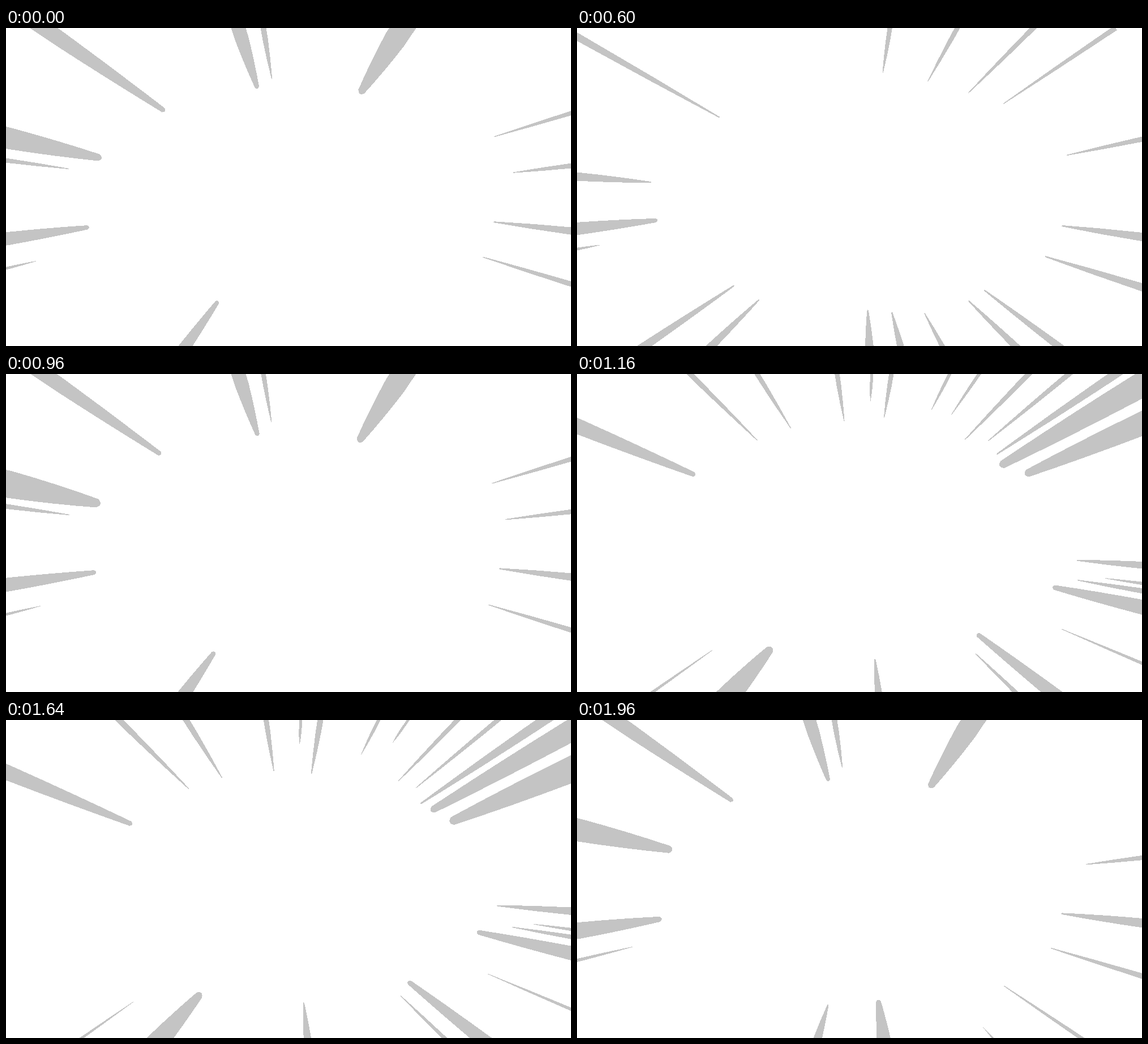
These frames come from a looping animation (998x561 px, 2000 ms). An HTML page:

```html
<!DOCTYPE html>
<html lang="en">
<head>
<meta charset="utf-8">
<title>Speed lines</title>
<style>
  html, body { margin: 0; width: 100%; height: 100%; overflow: hidden; background: #fff; }
  svg { display: block; width: 100vw; height: 100vh; }
</style>
</head>
<body>
<svg viewBox="0 0 998 561" preserveAspectRatio="none">
  <path id="lines" fill="#c4c4c4" shape-rendering="crispEdges"/>
</svg>
<script>
const W = 998, H = 561, STEP = 40, STEPS = 50;
const center = { x: 505, y: 301 };
const clearing = { rx: 346, ry: 189 };

// Ray width where it leaves the stage.
const weights = { hair: 5, thin: 9, medium: 15, bold: 25, heavy: 42 };

// Ray directions in degrees, clockwise from the right.
const burst = {
  heavy: [303, 192], bold: [214.5, 252.6, 172], medium: [6.6],
  thin: [260.5, 17, 353.3], hair: [166.3]
};
const burstEven = { bold: [125.8], thin: [343, 187.6] };
const burstOdd = { bold: [82], medium: [107], thin: [34], hair: [48.6] };
const sparse = {
  bold: [174], medium: [209.5, 184.4, 7.8, 17.6, 87.5, 75.7, 37, 44, 146, 135.8],
  thin: [279, 299, 315, 326, 348, 61.7], hair: [170]
};
const dense = {
  heavy: [330.2, 336.6, 131.6], bold: [202.5, 12.6, 38], medium: [4.2, 326, 84],
  thin: [224.6, 238.2, 261.4, 279.5, 314.2, 320.4, 44, 9.4],
  hair: [273, 297, 304.3, 7.9, 23, 145]
};
const cycle = [[burst, burstEven], [burst, burstOdd], [sparse], [sparse], [dense], [dense]];

const lines = document.getElementById('lines');

function noise(a, b) {
  const v = Math.sin(a * 12.9898 + b * 78.233) * 43758.5453;
  return v - Math.floor(v);
}

// A wedge that widens from the oval clearing to beyond the stage; thinner rays start farther out.
function ray(degrees, weight, step) {
  const angle = degrees * Math.PI / 180;
  const cos = Math.cos(angle), sin = Math.sin(angle);
  const width = weight * (0.85 + 0.3 * noise(step, degrees));
  const start = 1 + 8 / width ** 2 + 0.06 * noise(degrees, step);
  const tip = start / Math.hypot(cos / clearing.rx, sin / clearing.ry);
  const edge = Math.min(W / 2 / Math.abs(cos), H / 2 / Math.abs(sin));
  const end = Math.max(edge, tip + 20);
  const blunt = weight < weights.bold ? 0.08 : 0.16;

  const at = (radius, side) => {
    const x = center.x + cos * radius - sin * side * width;
    const y = center.y + sin * radius + cos * side * width;
    return `${x.toFixed(1)} ${y.toFixed(1)}`;
  };
  const mid = (tip + end) / 2, out = end + 2 * width + 20;
  return `M${at(out, 0.54)}L${at(end, 0.5)}Q${at(mid, 0.38)} ${at(tip + width * 0.15, blunt)}` +
    `Q${at(tip - width * 0.1, 0)} ${at(tip + width * 0.15, -blunt)}` +
    `Q${at(mid, -0.38)} ${at(end, -0.5)}L${at(out, -0.54)}Z`;
}

function draw(step) {
  let path = '';
  for (const group of cycle[step % cycle.length]) {
    for (const [name, angles] of Object.entries(group)) {
      for (const degrees of angles) path += ray(degrees, weights[name], step);
    }
  }
  lines.setAttribute('d', path);
}

const start = performance.now();
let shown = -1;
function tick(now) {
  const step = Math.floor(Math.max(0, now - start) / STEP) % STEPS;
  if (step !== shown) draw(shown = step);
  requestAnimationFrame(tick);
}
tick(start);
</script>
</body>
</html>
```
